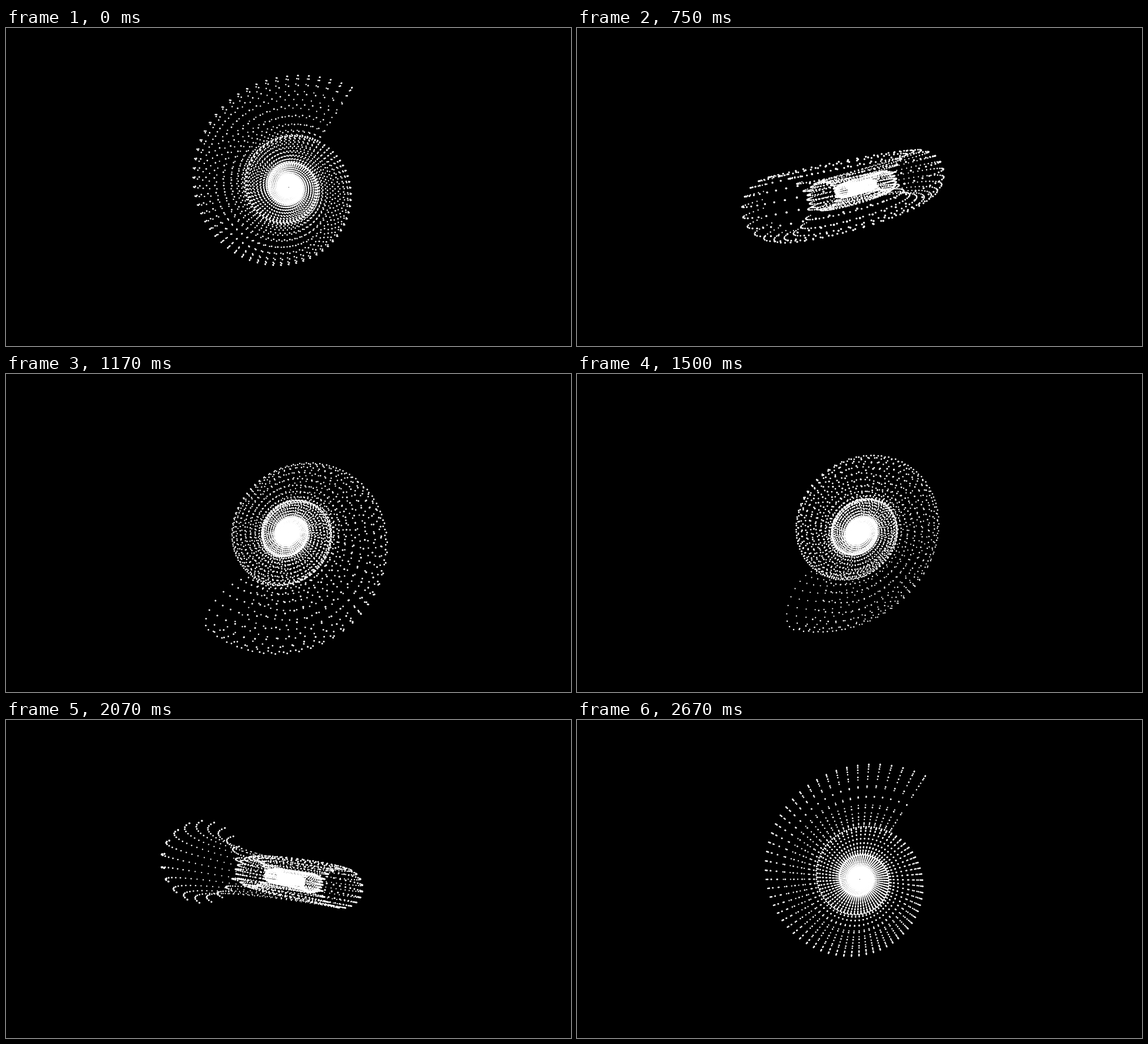
Recreate the animation shown at these times as an HTML page with a canvas. Size 960 by 540 pixels, loop 2700 ms.

```html
<!DOCTYPE html>
<html lang="en">
<head>
<meta charset="utf-8">
<title>Dotted shell</title>
<style>
  html, body { margin: 0; width: 100%; height: 100%; overflow: hidden; background: #000; }
  canvas { display: block; }
</style>
</head>
<body>
<canvas id="stage" width="960" height="540"></canvas>
<script>
const ctx = document.getElementById('stage').getContext('2d');
const RAD = Math.PI / 180;
const LOOP = 2700, STEP = 30;
const EYE = 450;                   // viewer distance
const RINGS = 345, SIDES = 20;
const TURN = 5.585 * RAD;          // angle between rings
const GROWTH = 0.1225;             // logarithmic growth per radian
const MOUTH = -57.4 * RAD;         // angle of the open end
const CORE = 149, TUBE = 53.8;     // spiral and tube radius at the open end
const DOT = 1.25;

// Rings of a tube wound along a logarithmic spiral.
const points = [];
for (let i = 0; i < RINGS; i++) {
  const back = i * TURN;
  const size = Math.exp(-GROWTH * back);
  const angle = MOUTH - back;
  for (let j = 0; j < SIDES; j++) {
    const phi = j * 2 * Math.PI / SIDES;
    const r = size * (CORE + TUBE * Math.cos(phi));
    points.push([r * Math.cos(angle), r * Math.sin(angle), size * TUBE * Math.sin(phi)]);
  }
}

function draw(angle) {
  const s = Math.sin(angle), c = Math.cos(angle);
  ctx.fillStyle = '#000';
  ctx.fillRect(0, 0, 960, 540);
  ctx.fillStyle = '#fff';
  for (const [x, y, z] of points) {
    // Turn about x, then about y by the same angle.
    const y1 = y * c - z * s;
    const z1 = y * s + z * c;
    const x2 = x * c + z1 * s;
    const z2 = z1 * c - x * s;
    const k = EYE / (EYE - z2);
    ctx.beginPath();
    ctx.arc(480 + x2 * k, 270 + y1 * k, DOT * k, 0, 2 * Math.PI);
    ctx.fill();
  }
}

let shown = -1;
function tick() {
  const n = Math.floor(performance.now() % LOOP / STEP);
  if (n !== shown) {
    shown = n;
    draw((n + 1) * 360 * STEP / LOOP * RAD);
  }
  requestAnimationFrame(tick);
}
tick();
</script>
</body>
</html>
```
